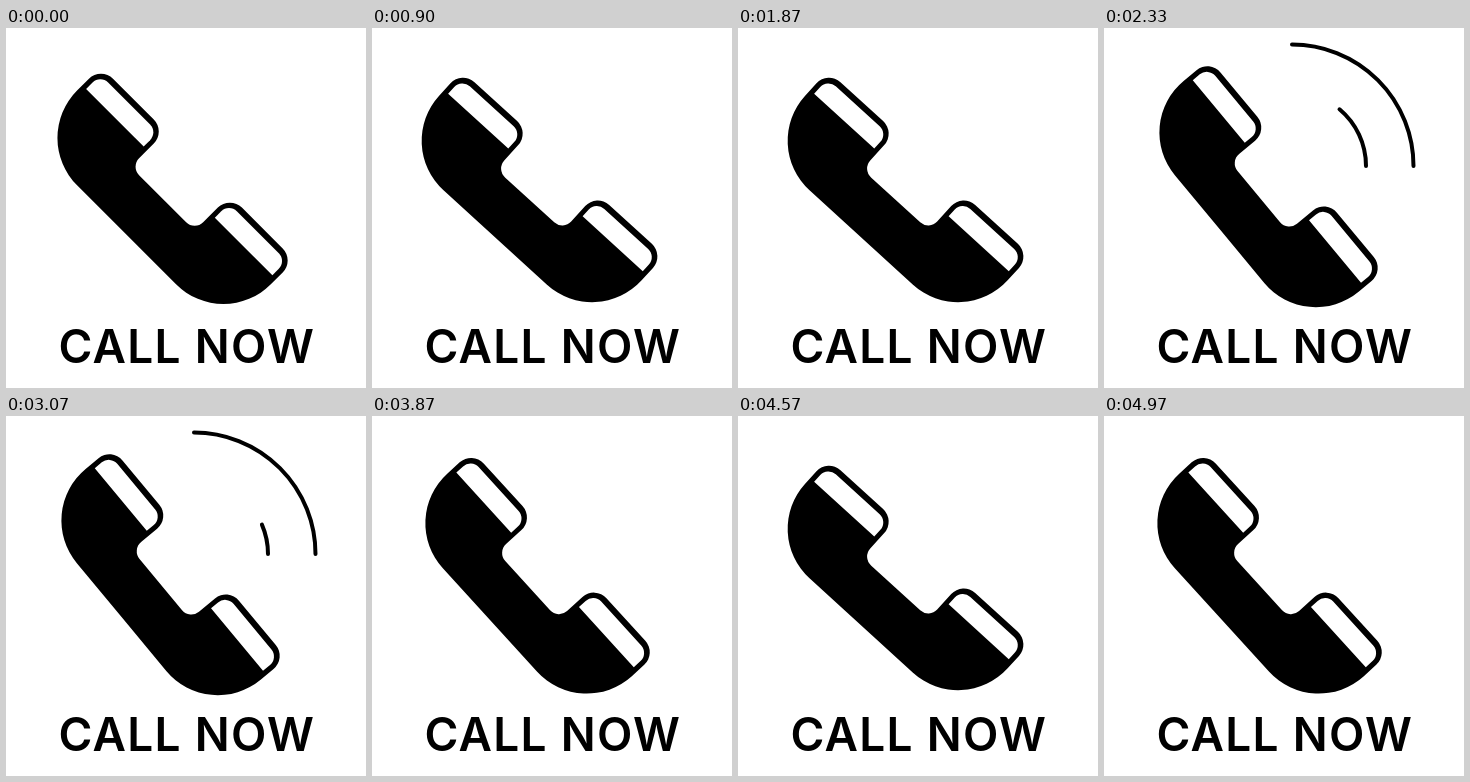
An HTML page with a canvas that plays this animation: 360 by 360 pixels, repeating every 5070 ms.

```html
<!DOCTYPE html>
<html lang="en">
<head>
<meta charset="utf-8">
<title>Call now</title>
<style>
html, body { margin: 0; width: 100%; height: 100%; overflow: hidden; background: #fff; }
canvas { display: block; width: 360px; height: 360px; }
</style>
</head>
<body>
<canvas id="stage" width="360" height="360"></canvas>
<script>
const ctx = document.getElementById('stage').getContext('2d');
const LOOP = 5070;
const SWING = 5.3; // degrees
const PIVOT = [180, 150];
const CENTER = 163.7;

// Corners of the handset as [x, y, radius], lying along the x axis.
const BODY = [
  [-137, 61, 67], [-137, -39.8, 17], [-45.3, -39.8, 17], [-45.3, 10, 12],
  [45.3, 10, 12], [45.3, -39.8, 17], [137, -39.8, 17], [137, 61, 67]
];

// 12.5 steps per second, aligned to a 30 Hz clock.
function stepAt(ms) {
  const tick = Math.floor((ms + 4) * 0.03 + 1e-6);
  return Math.floor(tick / 2.4 + 1e-6);
}

const ring = n => Math.sin((n + 0.5) * Math.PI / 3);

function tiltAt(step) {
  if (step >= 48) return ring(step - 48);
  if (step >= 6 && step < 24) return ring(step - 6);
  // Lift, hold while the waves show, put back.
  const lift = Math.min(step - 24, 41 - step) / 2;
  return Math.max(0, Math.min(1, lift));
}

function fillRounded(corners, x, y) {
  ctx.beginPath();
  ctx.moveTo(x, y);
  corners.forEach(([cx, cy, r], i) => {
    const [nx, ny] = corners[i + 1] || [x, y];
    ctx.arcTo(cx, cy, nx, ny, r);
  });
  ctx.closePath();
  ctx.fill();
}

function drawPhone(tilt) {
  ctx.save();
  ctx.translate(...PIVOT);
  ctx.rotate(tilt * SWING * Math.PI / 180);
  ctx.translate(CENTER - PIVOT[0], CENTER - PIVOT[1]);
  ctx.rotate(Math.PI / 4);
  ctx.fillStyle = '#000';
  fillRounded(BODY, 0, 61);
  ctx.fillStyle = '#fff';
  for (const x of [-131.7, 50.3]) {
    fillRounded([[x, -33.6, 11], [x + 81.4, -33.6, 11], [x + 81.4, -13.5, 0]], x, -13.5);
  }
  ctx.restore();
}

function drawWave(radius, part) {
  ctx.beginPath();
  ctx.arc(188, 138, radius, -part * Math.PI / 2, 0);
  ctx.stroke();
}

function drawWaves(step) {
  if (step < 27 || step > 38) return;
  const grow = Math.min(step - 27, 38 - step) / 5;
  ctx.strokeStyle = '#000';
  ctx.lineWidth = 4;
  ctx.lineCap = 'round';
  drawWave(121.5, 1);
  drawWave(74, 0.26 + 0.74 * grow);
}

function drawLabel() {
  ctx.fillStyle = '#000';
  ctx.font = '600 46px Inter, sans-serif';
  ctx.letterSpacing = '1.3px';
  ctx.textAlign = 'center';
  ctx.fillText('CALL NOW', 180.8, 335);
}

function draw(now) {
  const step = stepAt(now % LOOP);
  ctx.fillStyle = '#fff';
  ctx.fillRect(0, 0, 360, 360);
  drawPhone(tiltAt(step));
  drawWaves(step);
  drawLabel();
}

let start;
function tick(now) {
  if (start === undefined) start = now;
  draw(now - start);
  requestAnimationFrame(tick);
}
draw(0);
requestAnimationFrame(tick);
</script>
</body>
</html>
```
